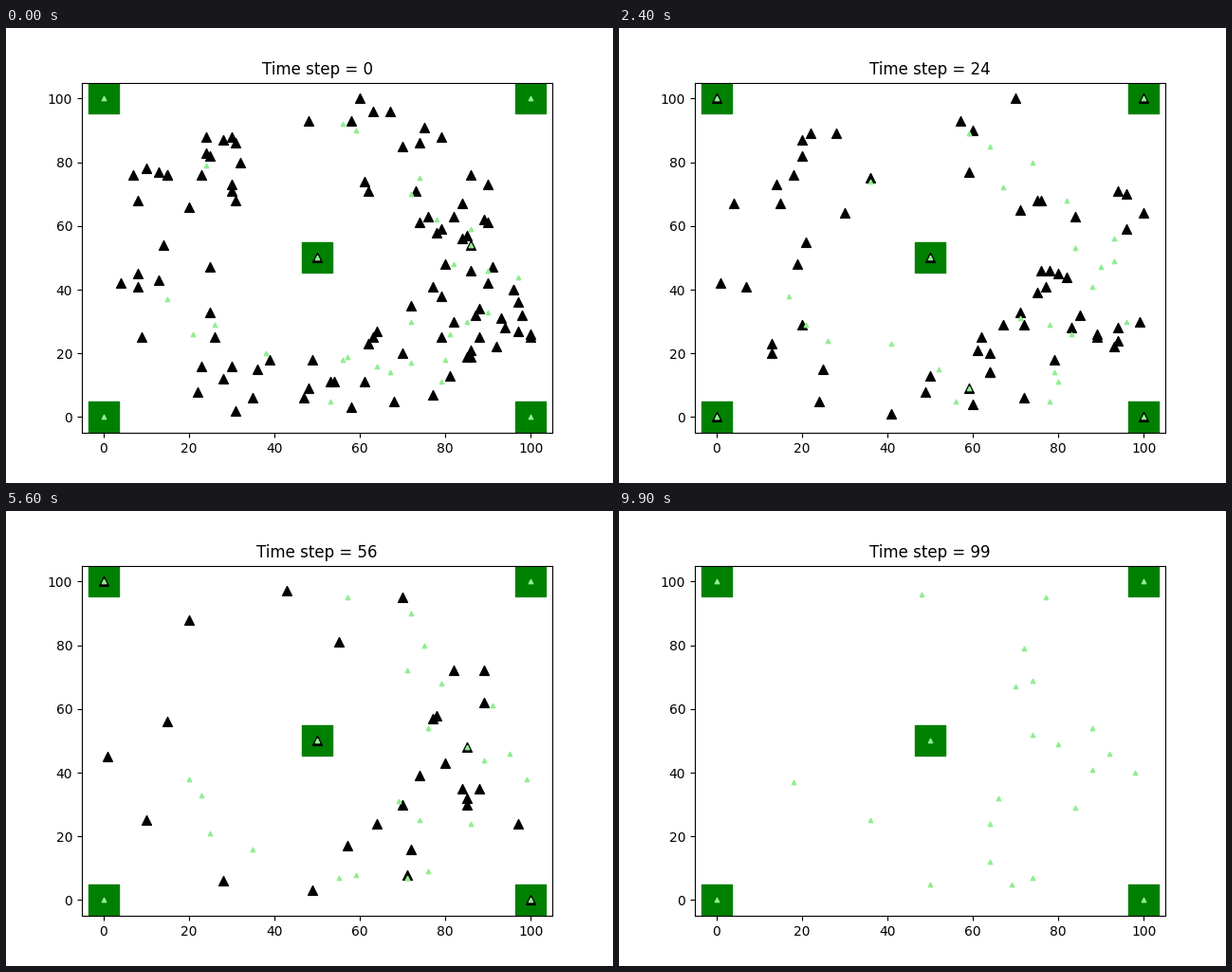
A matplotlib script that plays this animation: 640 px wide and 480 px high, repeating every 10000 ms.

```python
import matplotlib.pyplot as plt
import numpy as np
from matplotlib.animation import FuncAnimation

STEPS = 100
rng = np.random.default_rng(12)

# Nest: place, radius walkers keep away from, spans of steps with a visitor
NESTS = [
    ((50, 50), 24, [(0, 85)]),
    ((0, 100), 22, [(1, 81)]),
    ((100, 100), 22, [(2, 50), (64, 83)]),
    ((0, 0), 22, [(11, 49), (62, 86)]),
    ((100, 0), 22, [(1, 66)]),
]
HOMES = np.array([n[0] for n in NESTS])
RADII = np.array([n[1] for n in NESTS])

FAST_START, FAST_BORN, BREED_END = 99, 51, 9
SLOW_START, SLOW_LOST = 27, 7


def is_clear(p):
    in_field = p.min() >= 1 and p.max() <= 100
    return in_field and np.all(np.hypot(*(HOMES - p).T) >= RADII)


def pick(draw):
    """Draw places until one is free."""
    while not is_clear(p := draw()):
        pass
    return p


def anywhere():
    return rng.integers(1, 101, 2)


def lower_right():
    """A place around the centre, mostly below and to the right of it."""
    a = np.radians(rng.triangular(-200, -60, 160))
    r = rng.uniform(28, 52)
    return np.round(50 + r * np.array([np.cos(a), np.sin(a)]))


def wander(start, born, end, stride):
    """Random walk on whole places; a blocked step is skipped."""
    path = np.full((STEPS, 2), np.nan)
    path[born] = start
    for t in range(born + 1, end):
        step = path[t - 1] + rng.integers(-stride, stride + 1, 2)
        path[t] = step if is_clear(step) else path[t - 1]
    return path


def build_fast():
    """Walkers breed for a few steps, then thin out until none is left."""
    total = FAST_START + FAST_BORN
    left = [total, 60, 45, 27, 10, 0]
    when = [BREED_END + 1, 24, 39, 56, 73, 88]
    ends = np.interp(np.arange(total), left[::-1], when[::-1]).astype(int)
    rng.shuffle(ends)
    paths = [wander(pick(anywhere), 0, e, 2) for e in ends[:FAST_START]]
    for e in ends[FAST_START:]:
        born = rng.integers(1, BREED_END + 1)
        parent = paths[rng.integers(FAST_START)]
        paths.append(wander(parent[born - 1], born, e, 2))
    return np.array(paths)


def build_slow():
    ends = np.full(SLOW_START, STEPS)
    ends[:SLOW_LOST] = np.linspace(5, 80, SLOW_LOST)
    return np.array([wander(pick(lower_right), 0, e, 1) for e in ends])


def alive(paths, t):
    spots = paths[:, t]
    return spots[np.isfinite(spots[:, 0])]


def visitors(t):
    inside = [any(a <= t < b for a, b in spans) for _, _, spans in NESTS]
    return HOMES[np.array(inside)]


fast, slow = build_fast(), build_slow()

fig, ax = plt.subplots(figsize=(6.4, 4.8), dpi=100)
ax.set(xlim=(-5, 105), ylim=(-5, 105))
ax.scatter(*HOMES.T, s=500, marker="s", color="green", zorder=1)
black = ax.scatter([], [], s=50, marker="^", color="black", zorder=2)
green = ax.scatter([], [], s=10, marker="^", color="lightgreen", zorder=3)
title = ax.set_title("Time step = 0")


def update(t):
    black.set_offsets(np.vstack([alive(fast, t), visitors(t)]))
    green.set_offsets(np.vstack([alive(slow, t), HOMES]))
    title.set_text(f"Time step = {t}")
    return black, green, title


anim = FuncAnimation(fig, update, frames=STEPS, interval=100, repeat=True)
plt.show()
```
